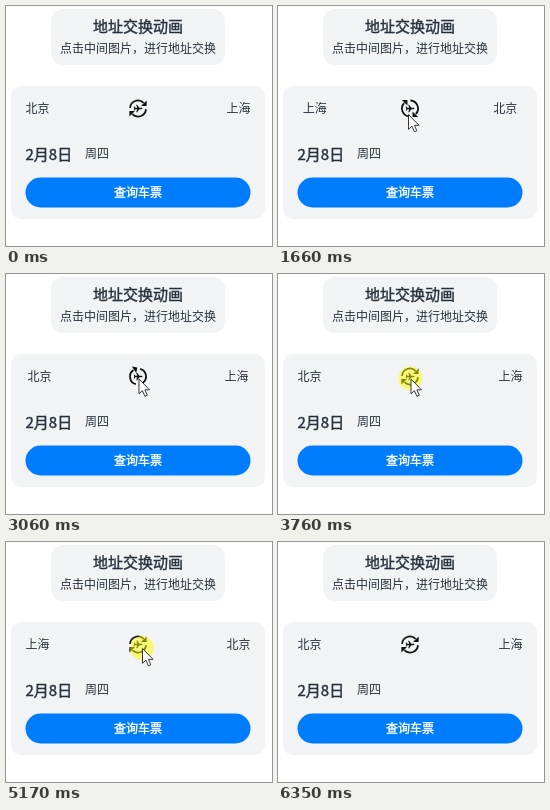
Write an HTML page that moves like this. It is 266 px wide and 240 px high and loops after 6.55 s.

```html
<!DOCTYPE html>
<html lang="zh-CN">
<head>
<meta charset="utf-8">
<title>地址交换动画</title>
<style>
  html, body { margin: 0; width: 100%; height: 100%; overflow: hidden; background: #fff; }
  svg { display: block; width: 266px; height: 240px; }
  text { font: 12px "Noto Sans CJK SC", "Noto Sans CJK", sans-serif; fill: #27313d; }
  /* a thin outline gives the medium weight */
  .medium { stroke: #27313d; stroke-width: .4px; }
  .large { font-size: 15px; }
  .middle { text-anchor: middle; }
  .button { fill: #fff; stroke: #fff; }
</style>
</head>
<body>
<svg viewBox="0 0 266 240">
  <defs>
    <g id="arrow">
      <path d="M-8 -.6 A8 8 0 0 1 5.6 -5.7" fill="none" stroke="#111" stroke-width="1.8"/>
      <path d="M8.6 -8 V-2.4 H3 Z" fill="#111"/>
    </g>
  </defs>

  <rect x="45" y="3" width="174" height="56" rx="12" fill="#f1f3f5"/>
  <text class="medium large middle" x="132" y="26">地址交换动画</text>
  <text class="middle" x="132" y="47">点击中间图片，进行地址交换</text>

  <rect x="5" y="80" width="254" height="133" rx="10" fill="#f1f3f5"/>
  <text id="beijing" y="107">北京</text>
  <text id="shanghai" y="107">上海</text>

  <g transform="translate(132 102.5)">
    <g id="arrows">
      <use href="#arrow"/>
      <use href="#arrow" transform="rotate(180)"/>
    </g>
    <path d="M4.6 0 Q4.4 -.8 3.4 -.8 H1.4 L-.9 -3.7 H-1.8 L-.8 -.8 H-2.7 L-3.5 -1.9 H-4.2 L-3.8 0 L-4.2 1.9 H-3.5 L-2.7 .8 H-.8 L-1.8 3.7 H-.9 L1.4 .8 H3.4 Q4.4 .8 4.6 0 Z" fill="#111"/>
  </g>

  <text class="medium large" x="19.5" y="153.5">2月8日</text>
  <text x="79" y="152">周四</text>
  <rect x="19.5" y="171.5" width="225" height="30" rx="15" fill="#007dff"/>
  <text class="medium middle button" x="132" y="191">查询车票</text>

  <g id="cursor">
    <circle id="press" r="12" fill="#ff0" fill-opacity=".5"/>
    <path d="M.5 .5 V15.3 L3.9 12.2 L6.4 17.8 L8.8 16.8 L6.4 11.3 H11 Z" fill="#fff" stroke="#222" stroke-width=".9" stroke-linejoin="round"/>
  </g>
</svg>
<script>
  const LOOP = 6550;
  const LEFT = 19.5, RIGHT = 220.5;
  const SPIN_TIME = 750, PRESS_TIME = 70;

  const rounds = [
    { press: 970, swap: 1290 },
    { press: 2430, swap: 2656 },
    { press: 3760, swap: 3976 },
    { press: 5140, swap: 5370 }
  ];

  const entry = { time: 210, x: 151, y: 182 };
  const glides = [
    { start: 210, end: 770, x: 130, y: 108 },
    { start: 2200, end: 2430, x: 132.5, y: 104.5 },
    { start: 4050, end: 4260, x: 234, y: 242 },
    { start: 4470, end: 4900, x: 136, y: 106 },
    { start: 5450, end: 5730, x: 220, y: 242 }
  ];

  const $ = id => document.getElementById(id);
  const clamp = v => Math.min(1, Math.max(0, v));
  const mix = (a, b, k) => a + (b - a) * k;
  const easeInOut = k => (1 - Math.cos(Math.PI * k)) / 2;
  const easeOut = k => 1 - (1 - k) ** 3;
  const show = (id, on) => $(id).setAttribute("display", on ? "inline" : "none");

  function spring(seconds, response = 0.6, damping = 0.83) {
    const w = 2 * Math.PI / response;
    const root = Math.sqrt(1 - damping * damping);
    const phase = w * root * seconds;
    return 1 - Math.exp(-damping * w * seconds) *
      (Math.cos(phase) + damping / root * Math.sin(phase));
  }

  function pointerAt(t) {
    let { x, y } = entry;
    for (const glide of glides) {
      const k = easeOut(clamp((t - glide.start) / (glide.end - glide.start)));
      x = mix(x, glide.x, k);
      y = mix(y, glide.y, k);
    }
    return [x, y];
  }

  function render(t) {
    // each swap turns the places around, so their sum alternates between 0 and 1
    let moved = 0, angle = 0;
    rounds.forEach(({ swap }, i) => {
      const age = Math.max(0, t - swap);
      moved += (i % 2 ? -1 : 1) * spring(age / 1000);
      angle += 180 * easeInOut(clamp(age / SPIN_TIME));
    });
    $("beijing").setAttribute("x", mix(LEFT, RIGHT, moved));
    $("shanghai").setAttribute("x", mix(RIGHT, LEFT, moved));
    $("arrows").setAttribute("transform", `rotate(${angle})`);
    $("cursor").setAttribute("transform", `translate(${pointerAt(t)})`);
    show("cursor", t >= entry.time);
    show("press", rounds.some(({ press }) => t >= press && t < press + PRESS_TIME));
  }

  const begin = performance.now();
  function tick() {
    render((performance.now() - begin) % LOOP);
    requestAnimationFrame(tick);
  }
  render(0);
  requestAnimationFrame(tick);
</script>
</body>
</html>
```
